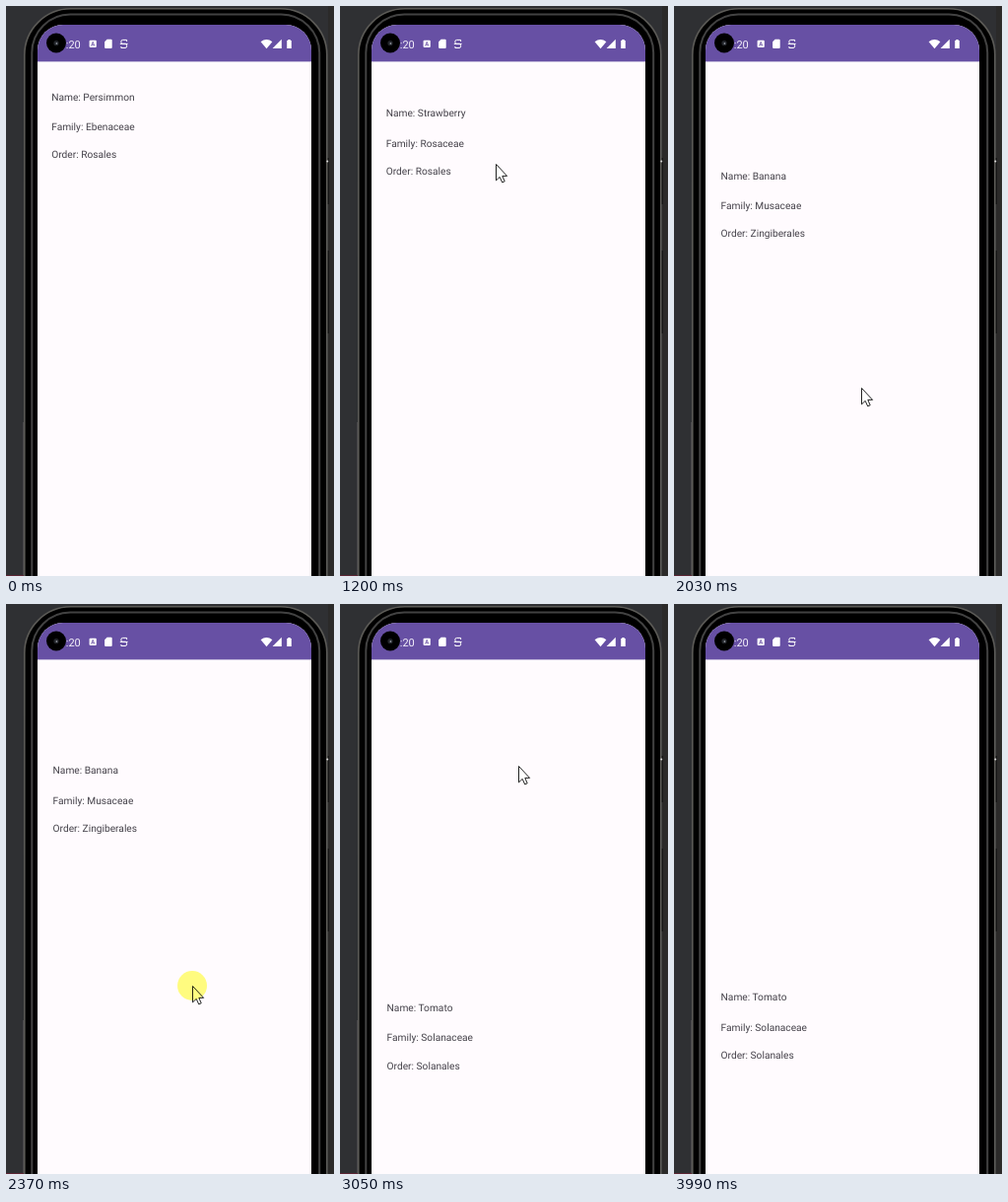
An HTML page that plays this animation: 333 by 578 pixels, repeating every 4.39 s.

```html
<!DOCTYPE html>
<html lang="en">
<head>
<meta charset="utf-8">
<title>Fruit list</title>
<style>
  html, body { margin: 0; width: 100%; height: 100%; overflow: hidden; background: #2f3033; }
  svg { display: block; width: 333px; height: 578px; }
  text { font-family: Roboto, sans-serif; text-rendering: geometricPrecision; }
  #list text { font-size: 10.2px; fill: #45424a; }
  #press { mix-blend-mode: multiply; }
</style>
</head>
<body>
<svg viewBox="0 0 333 578">
  <defs>
    <clipPath id="page"><rect x="32" y="56.4" width="278" height="522"/></clipPath>
    <clipPath id="screen"><rect x="32" y="19" width="278" height="620" rx="26"/></clipPath>
  </defs>

  <!-- phone body -->
  <rect width="333" height="578" fill="#2f3033"/>
  <rect x="327" width="6" height="578" fill="#2b2a29"/>
  <path d="M17.5 422V578" stroke="#48474a"/>
  <path d="M326.8 154V201M326.8 248V332" stroke="#111" stroke-width="2"/>
  <rect x="18.8" y="2.8" width="307" height="640" rx="47" stroke="#5b5a56" stroke-width="1.6"/>
  <rect x="26.3" y="8.5" width="291.9" height="640" rx="39" stroke="#424242" stroke-width="2"/>
  <circle cx="326.3" cy="157.5" r="1" fill="#ddd"/>
  <path d="M0 577.5H18" stroke="#5a2433"/>

  <!-- screen and status bar -->
  <g clip-path="url(#screen)">
    <rect x="32" y="19" width="278" height="559" fill="#fffbfe"/>
    <rect x="32" y="19" width="278" height="37.4" fill="#6750a4"/>
  </g>
  <text x="75.8" y="42.6" text-anchor="end" font-size="11" fill="#f3effa">1:20</text>
  <circle cx="51" cy="37.5" r="10"/>
  <circle cx="51" cy="37.7" r="2.6" fill="#23262b"/>
  <circle cx="51.4" cy="38" r=".9" fill="#8b8f98"/>
  <g fill="#fff">
    <rect x="84.6" y="34.8" width="7.2" height="7.2" rx="1"/>
    <path d="M102.6 33.8H106.6Q107.7 33.8 107.7 34.9V42Q107.7 43.1 106.6 43.1H101.2Q100.1 43.1 100.1 42V36.3Z"/>
    <path d="M258.6 36.2Q264.5 31.6 270.4 36.2L264.5 43.2Z"/>
    <path d="M279.8 33.7V43H270.6Z"/>
    <path d="M285.2 35H286.3V34H288.7V35H289.8V43H285.2Z"/>
  </g>
  <path d="M86.6 40.6L88.2 36.3L89.8 40.6M87.1 39.3H89.3" fill="none" stroke="#6750a4" stroke-width=".8"/>
  <path d="M122.6 36V34.4H118.5Q116.8 34.4 116.8 36.4T118.5 38.4H121Q122.7 38.4 122.7 40.5T121 42.5H116.9V41M115.8 38.4H123.6" fill="none" stroke="#fff"/>

  <g clip-path="url(#page)"><g id="list"></g></g>

  <g id="pointer">
    <path d="M.5 .5V16.9L4.2 13.4L6.7 18.9L9.2 17.8L6.8 12.4H11.6Z" fill="#fff" stroke="#222" stroke-linejoin="round"/>
    <circle id="press" r="15" fill="#ffff80"/>
  </g>
</svg>

<script>
const LOOP = 4390, STEP = 69, START = 650, PITCH = 532;
const $ = id => document.getElementById(id);

// name, family, order, left edge
const fruits = [
  ['Persimmon', 'Ebenaceae', 'Rosales', 46.2],
  ['Strawberry', 'Rosaceae', 'Rosales', 46.7],
  ['Banana', 'Musaceae', 'Zingiberales', 47.6],
  ['Tomato', 'Solanaceae', 'Solanales', 47.6]
];
$('list').innerHTML = fruits.map(([name, family, order, x], i) => {
  const line = (label, y) => `<text x="${x}" y="${y + i * PITCH}">${label}</text>`;
  return line('Name: ' + name, 95.7) + line('Family: ' + family, 126.2) + line('Order: ' + order, 154.3);
}).join('');

// press at down, scroll from start, let go at up with the list at drag, glide on to rest
const swipes = [
  { down: 500, start: 700, up: 928, drag: 340, rest: 542 },
  { down: 1430, start: 1530, up: 1690, drag: 840, rest: 986 },
  { down: 2170, start: 2372, up: 2897, drag: 1238, rest: 1289.5 }
];

// turning points of the pointer: ms, x, y
const path = [
  [167, 232, 508], [305, 200, 475], [581, 200, 475], [650, 197, 451], [960, 155, 108],
  [1040, 154, 108], [1202, 158, 160], [1440, 193, 425], [1720, 184, 168], [2030, 190, 387],
  [2390, 189, 387], [2651, 177, 231], [2860, 171, 130], [3065, 181, 164], [3134, 181, 164],
  [3341, 284, 428], [3893, 302, 566]
];

// steady drag, then a fling that starts at the same speed and dies away
function scrollAt(t) {
  let from = 0, y = 0;
  for (const { start, up, drag, rest } of swipes) {
    if (t < start) break;
    const speed = (drag - from) / (up - start), left = rest - drag;
    y = t < up ? from + speed * (t - start) : rest - left * Math.exp((up - t) * speed / left);
    from = rest;
  }
  return y;
}

function pointerAt(t) {
  const i = Math.max(1, path.findIndex(p => p[0] >= t));
  const [t0, x0, y0] = path[i - 1], [t1, x1, y1] = path[i];
  const f = Math.min(1, Math.max(0, (t - t0) / (t1 - t0)));
  return [x0 + (x1 - x0) * f, y0 + (y1 - y0) * f];
}

function draw(now) {
  const ms = now % LOOP;
  const t = START + STEP * Math.floor((ms - START) / STEP + .25);
  const shown = ms >= 190 && ms < 3990;
  $('list').setAttribute('transform', `translate(0 ${-scrollAt(t)})`);
  $('pointer').style.display = shown ? '' : 'none';
  if (!shown) return;
  const [x, y] = pointerAt(Math.min(t, path.at(-1)[0]));
  $('pointer').setAttribute('transform', `translate(${x} ${y})`);
  $('press').style.display = swipes.some(s => t >= s.down && t < s.up) ? '' : 'none';
}

let begin;
function tick(now) {
  begin ??= now;
  draw(now - begin);
  requestAnimationFrame(tick);
}
draw(0);
requestAnimationFrame(tick);
</script>
</body>
</html>
```
